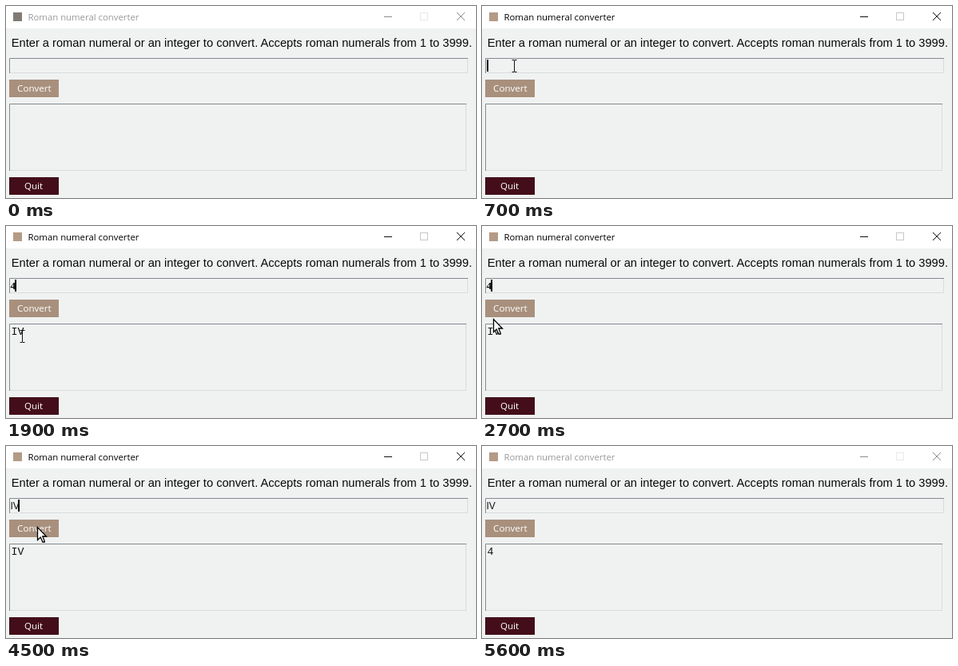
An HTML page for the animation above (5700 ms loop, 588x240 px).

```html
<!DOCTYPE html>
<html lang="en">
<head>
<meta charset="utf-8">
<title>Roman numeral converter</title>
<style>
  html, body { margin: 0; width: 100%; height: 100%; overflow: hidden; background: #f0f2f2; }
  svg { display: block; width: 588px; height: 240px; }
  text { white-space: pre; }
  .ui { font-family: "Open Sans", "Noto Sans", sans-serif; }
  .label { font: 14.65px "Liberation Sans", Arial, sans-serif; }
  .field { font: 12px "Liberation Sans", Arial, sans-serif; }
  .strong { font: bold 13px "Liberation Serif", serif; }
  .mono { font: 13.33px "Liberation Mono", monospace; }
  .button { font-size: 11.6px; fill: #fff; text-anchor: middle; }
  .edge { fill: none; stroke-width: 1; }
  .dark { stroke: #858a90; }
  .light { stroke: #d9dcdc; }
</style>
</head>
<body>
<svg viewBox="0 0 588 240" xmlns="http://www.w3.org/2000/svg">
  <rect width="588" height="240" fill="#f0f2f2"/>
  <rect width="588" height="28" fill="#fff"/>
  <rect id="icon" x="9" y="8" width="11" height="11"/>
  <text id="title" class="ui" x="27.5" y="18" font-size="11.35">Roman numeral converter</text>
  <g id="controls" class="edge">
    <path d="M473 13.5H483"/>
    <path d="M564 8L574 18M574 8L564 18"/>
  </g>
  <rect id="maxBox" class="edge" x="518.5" y="8.5" width="9" height="9"/>
  <text class="label" x="6.8" y="51" fill="#080808">Enter a roman numeral or an integer to convert. Accepts roman numerals from 1 to 3999.</text>

  <path class="edge light" d="M4 83.5H577.5V65"/>
  <path class="edge dark" d="M4.5 84V65.5H578"/>
  <path class="edge light" d="M4 205.5H575.5V122"/>
  <path class="edge dark" d="M4.5 206V122.5H576"/>

  <rect x="4" y="92" width="62" height="22" fill="#a8907d"/>
  <text class="ui button" x="35.4" y="107">Convert</text>
  <rect x="4" y="214" width="62" height="22" fill="#430e19"/>
  <text class="ui button" x="34.5" y="229">Quit</text>

  <rect id="selection" x="5" y="67" width="8" height="15" fill="#0078d7"/>
  <text id="entry" x="5.5" y="79"></text>
  <rect id="caret" y="67" width="2" height="15" fill="#000"/>
  <text id="output" class="mono" x="6.5" y="136" fill="#111"></text>

  <path id="arrow" d="M.5 .5V16.5L4.2 13L6.9 19H9.2V17.8L6.8 12H11.5Z" fill="#fff" stroke="#000" stroke-width="1.3"/>
  <path id="beam" class="edge" stroke="#111" d="M-3 -7.5H-.5M.5 -7.5H3M0 -7.5V7.5M-3 7.5H-.5M.5 7.5H3"/>
</svg>
<script>
const LOOP = 5700, TICK = 100;
const el = id => document.getElementById(id);
const set = (id, attrs) => {
  for (const k in attrs) el(id).setAttribute(k, attrs[k]);
};
const show = (id, on) => set(id, { visibility: on ? "visible" : "hidden" });
const within = (n, a, b) => n >= a && n < b;
const ease = k => k * k * (3 - 2 * k);

// Where the pointer goes, and between which ticks; it rests in between
const moves = [
  { from: 1, to: 4, x: 194, y: 96 },   // into the window
  { from: 4, to: 6, x: 40, y: 75 },    // entry field
  { from: 9, to: 13, x: 43, y: 96 },   // Convert
  { from: 14, to: 19, x: 20, y: 138 }, // result
  { from: 25, to: 30, x: 3, y: 75 },   // start of the drag
  { from: 30, to: 33, x: 61, y: 85 },  // end of the drag
  { from: 39, to: 43, x: 39, y: 101 }, // Convert
  { from: 46, to: 50, x: 190, y: 222 } // out
];

function pointerAt(n) {
  let x = 480, y = 222;
  for (const m of moves) {
    const k = ease(Math.min(1, Math.max(0, (n - m.from) / (m.to - m.from))));
    x += (m.x - x) * k;
    y += (m.y - y) * k;
  }
  return { x: Math.round(x), y: Math.round(y) };
}

function drawPointer(n) {
  const { x, y } = pointerAt(n);
  const visible = within(n, 1, 51);
  const dragging = within(n, 30, 36);
  const overText = dragging || within(y, 65, 84) || within(y, 122, 206);
  show("arrow", visible && !overText);
  show("beam", visible && overText);
  set("arrow", { transform: `translate(${x} ${y})` });
  set("beam", { transform: `translate(${x + 0.5} ${y})` });
}

function drawEntry(n) {
  const selected = within(n, 31, 36);
  const strong = within(n, 16, 31);
  el("entry").textContent = n < 9 ? "" : n < 36 ? "4" : n < 37 ? "I" : "IV";
  set("entry", { class: strong ? "strong" : "field", fill: selected ? "#fff" : "#111" });
  show("selection", selected);
  show("caret", within(n, 7, 12) || within(n, 16, 56));
  set("caret", { x: Math.max(6, Math.round(4 + el("entry").getComputedTextLength())) });
}

function draw(ms) {
  const n = Math.floor(ms % LOOP / TICK);
  const active = within(n, 7, 56);
  set("title", { fill: active ? "#000" : "#999" });
  set("controls", { stroke: active ? "#111" : "#8c8c8c" });
  set("maxBox", { stroke: active ? "#c8c8c8" : "#e9e9e9" });
  set("icon", { fill: n < 1 ? "#817b74" : "#b39b86" });
  el("output").textContent = n < 15 ? "" : n < 46 ? "IV" : "4";
  drawEntry(n);
  drawPointer(n);
}

const start = performance.now();
function loop() {
  draw(performance.now() - start);
  requestAnimationFrame(loop);
}
loop();
</script>
</body>
</html>
```
